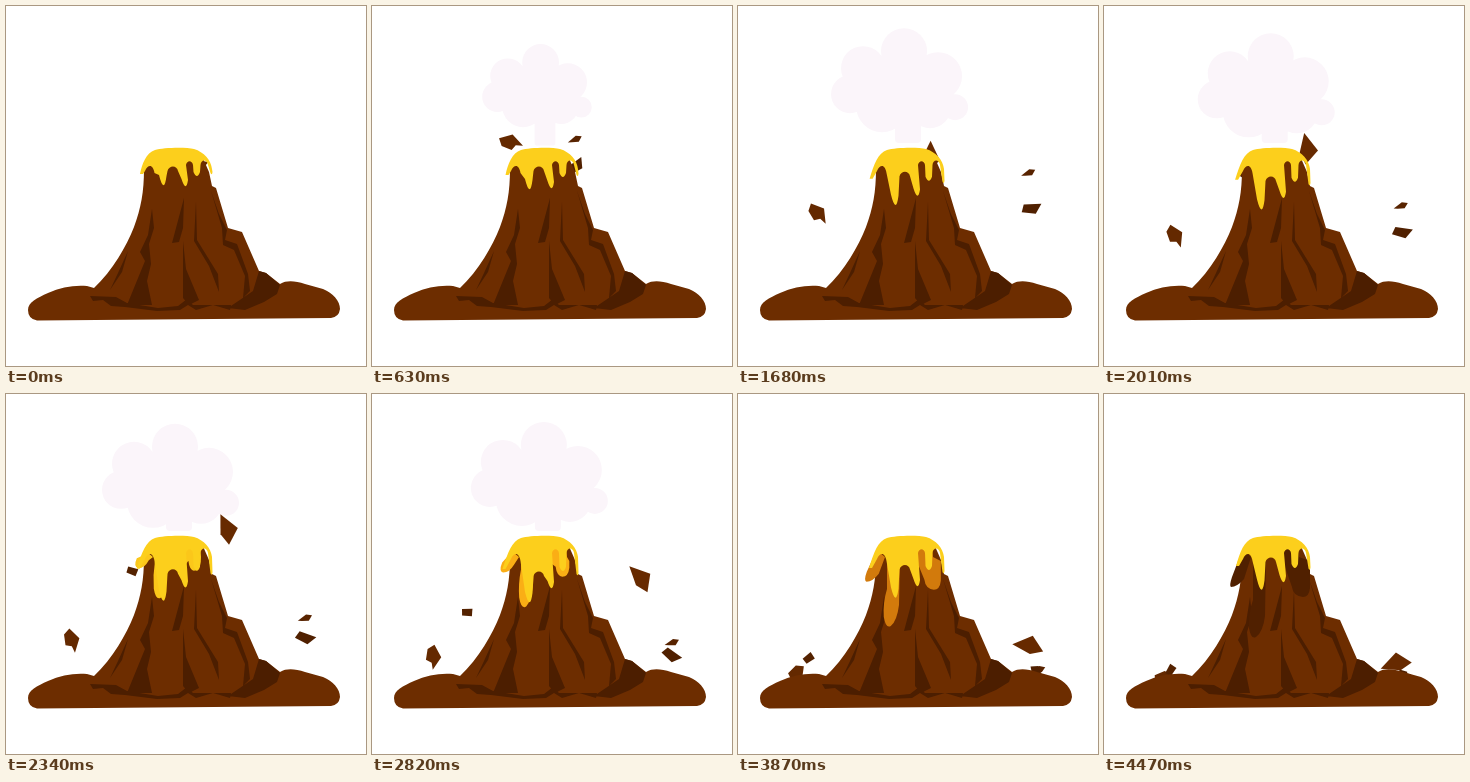
An HTML page with a canvas that plays this animation: 360 by 360 pixels, repeating every 4500 ms.

```html
<!DOCTYPE html>
<html lang="en">
<head>
<meta charset="utf-8">
<title>Volcano</title>
<style>
html, body { margin: 0; width: 100%; height: 100%; overflow: hidden; background: #fff; }
canvas { display: block; width: 100vmin; height: 100vmin; }
</style>
</head>
<body>
<canvas id="stage" width="360" height="360"></canvas>
<script>
const ctx = document.getElementById('stage').getContext('2d');
const LOOP = 4500, STEP = 30;
const BROWN = '#6d2d00', DARK = '#4c1e00', SMOKE = '#fbf5fa';
const YELLOW = [252, 207, 28], ORANGE = [248, 148, 15], COLD = [80, 32, 0];

const clamp = v => Math.min(1, Math.max(0, v));
const smooth = v => (v = clamp(v)) * v * (3 - 2 * v);
const mix = (a, b, u) => a + (b - a) * u;
const blend = (a, b, u) => `rgb(${a.map((v, i) => Math.round(mix(v, b[i], u)))})`;

function fill(path, color) {
  ctx.fillStyle = color;
  ctx.fill(path instanceof Path2D ? path : new Path2D(path));
}

const mountain = new Path2D(`M22 304C22 296 31 292 42 287C55 281 68 279 81 280L88 282
  C107 264 120 241 128 221C135 202 138 186 138 163L148 150H196L203 166L206 180L210 182
  L222 222L236 226L253 265L260 267L274 278C281 274 289 275 299 278L317 283
  C327 287 334 295 334 303Q333 311 325 312L31 314.500Q22 313 22 304Z`);

const shadows = new Path2D(`M253 265L260 267L274 279L271 288L258 296L239 304L222 302L247 285Z
  M205 185L213 208L221 224L219 234L231 238L242 268L244 285L237 292L239 270L228 244L217 239L216 222Z
  M146 203L148 222L143 238L145 258L141 275L146 299L121 299L139 255L134 246L142 229Z
  M178 192L177 222L173 236L166 237Z
  M190 196L191 234L212 268L213 286L203 260L188 235Z
  M177 235L180 263L193 294L183 299L177 292Z
  M122 245L116 266L104 284L112 267Z
  M84 290L110 291L121 297L152 302L172 300L181 293L187 299L225 299L224 304L207 299L190 304
  L182 299L174 304L151 305L119 301L105 300L97 294L87 295Z`);

// Rocks climb from the crater to (x, y) at time `apex`, then settle towards `land`.
// `drift` is the sideways settling time in ms, `spin` is in degrees per second.
const RISE = 1150, FALL = 1080, RIM = 162, GROUND = 292;
const rocks = [
  { shape: 'M-10-6L4-7L12 6L5 4L0 8L-9 2Z', color: '#642900',
    from: 155, x: 122, y: 126, land: 57, apex: 956, drift: 680, spin: 35 },
  { shape: 'M-7 3L1-3.500L7-3L4 2.500L-3 3Z', color: '#582300',
    from: 187, x: 256, y: 102, land: 300, apex: 1230, drift: 300, spin: 2 },
  { shape: 'M-8-1L9-6L6 5L-8 7Z', color: '#502000',
    from: 187, x: 262, y: 157, land: 300, apex: 1250, drift: 250, spin: 33 },
  { shape: 'M-8-15L10-2L2 15L-7 5Z', color: '#672a00',
    from: 187, x: 226, y: 134, land: 293, apex: 2405, drift: 400, spin: -40 },
  { shape: 'M-4-5L6-2L3 5L-6 1Z', color: '#542200',
    from: 155, x: 131, y: 172, land: 64, apex: 2290, drift: 700, spin: -36 }
];

function drawRock({ shape, color, from, x, y, land, apex, drift, spin }, t) {
  const age = t - apex, up = clamp(1 + age / RISE);
  const settle = time => 1 - Math.exp(-Math.max(0, age) / time);
  ctx.save();
  ctx.translate(mix(mix(from, x, up * up), land, settle(drift)),
    mix(mix(RIM, y, up), GROUND, settle(FALL)));
  ctx.rotate(spin * age / 1000 * Math.PI / 180);
  fill(shape, color);
  ctx.restore();
}

// Cloud lobes: x, y, radius
const lobes = [[169, 33, 23], [128, 50, 22], [203, 58, 24], [115, 76, 19], [220, 89, 13],
  [147, 88, 26], [167, 70, 38], [195, 89, 21]];

function drawSmoke(t) {
  const size = 1 - (1 - clamp(t / 1140)) ** 2;
  const sway = Math.max(0, t - 1140);
  const x = 167 - 3 * Math.sin(sway / 2400 * 2 * Math.PI);
  const y = mix(150, 75, size) + 20 * Math.sin(sway / 2600 * Math.PI);
  const cloud = new Path2D();
  for (const [cx, cy, r] of lobes) {
    const px = x + (cx - 167) * size, py = y + (cy - 75) * size;
    cloud.moveTo(px + r * size, py);
    cloud.arc(px, py, r * size, 0, 7);
  }
  cloud.roundRect(x + 6 - 13 * size, y, 26 * size, Math.max(1, mix(150, 137, size) - y), 4 * size);
  ctx.globalAlpha = clamp(t / 350) * clamp((3750 - t) / 560);
  fill(cloud, SMOKE);
  ctx.globalAlpha = 1;
}

// Older lava that creeps on below the fresh layer and cools to rock.
function drawCooling(t) {
  const k = (t - 2190) / 2280;
  if (k < 0) return;
  const left = 173 + 20 * k, main = 202 + 42 * k, right = 175 + 28 * k;
  const s = 6 * k, edge = 194 + 12 * k;
  const color = k < .5 ? blend(YELLOW, ORANGE, 2 * k) : blend(ORANGE, COLD, (2 * k - 1) ** 2);
  fill(`M141 158L147 163L${143 - s / 2} ${left - 8}Q${139 - s} ${left} ${133 - s} ${left}
    Q${127 - s / 3} ${left - 1} ${131 - s / 2} ${left - 10}L136 162Z
    M149 160H162L161 ${main - 22}Q159 ${main - 6} ${155 - s / 2} ${main - 1}
    Q${150 - s / 2} ${main + 2} ${148 - s / 2} ${main - 10}
    Q${147 - s / 2} ${main - 24} 149 ${main - 38}Z
    M180 154H194L195 163L${edge} 167V${right - 9}Q${edge - 1} ${right} ${edge - 7} ${right}
    Q${183 + s} ${right - 1} ${182 + s} ${right - 10}L180 170Z`, color);
}

function drawLava(t) {
  const flow = smooth(t / 2700) - .45 * Math.max(0, t / 1500 - 2) ** 2;
  const left = 168 + 7 * flow, a = 180 + 29 * flow, b = 181 + 14 * flow;
  const c = 171 + 7 * flow, right = 170 + 13 * flow;
  const gap = 160 + 17 * flow ** 3, tip = 134 - 3.5 * flow;
  fill(`M${tip} ${left}C136 158 140 147 149 144C157 141.500 180 141 188 143
    C198 146 205 154 206 163L206.500 ${right - 4}Q206 ${right} 204.500 ${right - 3}
    L202 159C201 153 195 153 194.500 159L194 ${c - 5}Q191 ${c + 3} 187.500 ${c - 5}
    L187 159C186 154 181 154 180 159L182 ${b - 7}Q180 ${b + 6} 175.500 ${b - 8}
    L172 ${gap + 5}C171 ${gap - 1} 163 ${gap - 1} 161.500 ${gap + 5}
    L160.500 ${a - 10}Q158 ${a + 9} 153 ${a - 11}
    L148.500 167C147 158 142 158 139 165L${tip + 3} ${left}Z`, blend(YELLOW, YELLOW, 0));
}

function draw(t) {
  ctx.fillStyle = '#fff';
  ctx.fillRect(0, 0, 360, 360);
  drawSmoke(t);
  rocks.forEach(rock => drawRock(rock, t));
  fill(mountain, BROWN);
  fill(shadows, DARK);
  drawCooling(t);
  drawLava(t);
}

const start = performance.now();
function tick() {
  const t = (performance.now() - start) % LOOP;
  draw(Math.floor(t / STEP) * STEP);
  requestAnimationFrame(tick);
}
tick();
</script>
</body>
</html>
```
